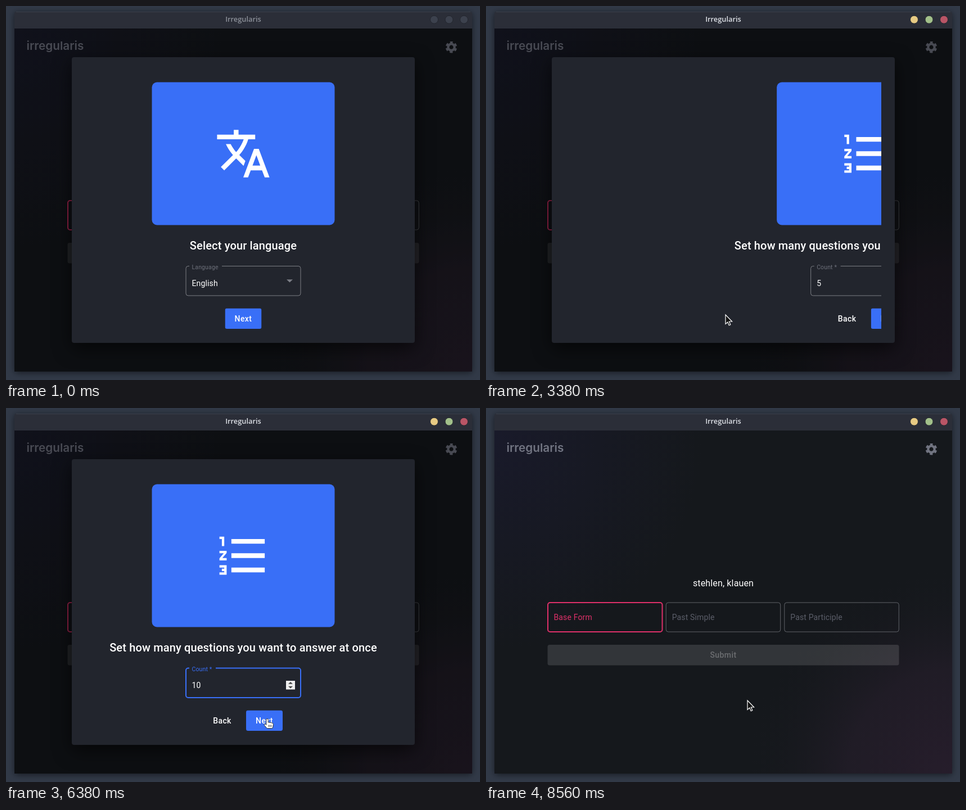
Recreate the animation shown at these times as an HTML page. Size 843 by 665 pixels, loop 9.2 s.

```html
<!DOCTYPE html>
<html lang="en">
<head>
<meta charset="utf-8">
<title>Irregularis</title>
<style>
  html, body { margin: 0; width: 100%; height: 100%; overflow: hidden; background: #313946; }
  svg { display: block; }
  text { font: 14px Roboto, sans-serif; letter-spacing: .14px; fill: #fff; }
  .mid { text-anchor: middle; }
  .bold { font-weight: 500; letter-spacing: .4px; }
  .head { font-size: 20px; font-weight: 500; letter-spacing: .15px; }
  .label { font-size: 10.5px; fill: #6d707a; }
  .outline { fill: none; stroke: #7c7e84; stroke-width: 1; }
  .hover .outline { stroke: #96989d; stroke-width: 1.8; }
  .focus .outline { stroke: #396ff7; stroke-width: 2; }
  .focus .label { fill: #396ff7; }
  .dot { fill: #3c414d; stroke: #23262e; }
  #title { font: 600 12.8px "Open Sans", sans-serif; letter-spacing: 0; fill: #8c9099; }
  .active #title { fill: #dde0e6; }
  .active .dot { fill: var(--c); }
</style>
</head>
<body>
<svg id="stage" width="843" height="665" viewBox="0 0 843 665"></svg>
<script>
const LOOP = 9200, BLUE = '#396ff7', SHIFT = 562;
const OPEN = 1250, CHOOSE = 1810, NEXT1 = 3097, NEXT2 = 6560, FINISH = 8130;
const stage = document.getElementById('stage');

const icons = {
  translate: 'M12.87 15.07l-2.54-2.51.03-.03c1.74-1.94 2.98-4.17 3.71-6.53H17V4h-7V2H8v2H1v1.99h11.17C11.5 7.92 10.44 9.75 9 11.35 8.07 10.32 7.3 9.19 6.69 8h-2c.73 1.63 1.73 3.17 2.98 4.56l-5.09 5.02L4 19l5-5 3.11 3.11.76-2.04zM18.5 10h-2L12 22h2l1.12-3h4.75L21 22h2l-4.5-12zm-2.62 7l1.62-4.33L19.12 17h-3.24z',
  list: 'M2 17h2v.5H3v1h1v.5H2v1h3v-4H2v1zm1-9h1V4H2v1h1v3zm-1 3h1.8L2 13.1v.9h3v-1H3.2L5 10.9V10H2v1zm5-6v2h14V5H7zm0 14h14v-2H7v2zm0-6h14v-2H7v2z',
  done: 'M22 5.18 10.59 16.6l-4.24-4.24 1.41-1.41 2.83 2.83 10-10L22 5.18zm-2.21 5.04c.13.57.21 1.17.21 1.78 0 4.42-3.58 8-8 8s-8-3.58-8-8 3.58-8 8-8c1.58 0 3.04.46 4.28 1.25l1.44-1.44C16.1 2.67 14.13 2 12 2 6.48 2 2 6.48 2 12s4.48 10 10 10 10-4.48 10-10c0-1.19-.22-2.33-.6-3.39l-1.61 1.61z'
};

const text = (x, y, s, cls = '', extra = '') => `<text x="${x}" y="${y}" class="${cls}" ${extra}>${s}</text>`;

const ripple = (time, x, y) => `<circle class="ripple" data-time="${time}" cx="${x}" cy="${y}" fill="#fff"/>`;

const button = (x, y, w, label, time) =>
  `<svg x="${x}" y="${y}" width="${w}" height="36.5"><rect width="${w}" height="36.5" rx="3.5" fill="${BLUE}"/>
   ${ripple(time, 38, 16)}${text(w / 2, 23, label, 'mid bold')}</svg>`;

const card = (icon, title) =>
  `<rect x="259.5" y="135.5" width="325" height="254" rx="9" fill="${BLUE}"/>
   <path d="${icons[icon]}" transform="translate(371.2 211.7) scale(4.235)" fill="#fff"/>
   ${text(422, 432.7, title, 'mid head')}`;

// Outlined box whose top edge is open from x=326 to the end of the label.
const field = (id, label, notch) =>
  `<g id="${id}"><path class="outline" d="M${notch} 462.5H520a4 4 0 0 1 4 4V511a4 4 0 0 1-4 4H324a4 4 0 0 1-4-4V466.5a4 4 0 0 1 4-4H326"/>
   ${text(330.5, 468.3, label, 'label')}${text(330.5, 497.7, '', 'value')}</g>`;

const answer = (x, label, color, border, width) =>
  `<rect x="${x}" y="346" width="203.5" height="52" rx="4" fill="none" stroke="${border}" stroke-width="${width}"/>
   ${text(x + 10.5, 377.3, label, '', `style="fill:${color}"`)}`;

const languages = ['English', 'Slovak', 'Spanish', 'Hungarian', 'German'];
const ROW = 41.7;
const menuRow = (name, i) =>
  `<svg x="314" y="${293 + i * ROW}" width="212" height="${ROW}">
   <rect width="212" height="${ROW}" fill="${['#42454f', , , , '#303237'][i] || 'none'}"/>
   ${i == 4 ? ripple(CHOOSE - 30, 114, 20) : ''}
   ${text(16.5, 25.2, name, '', i ? '' : `style="fill:${BLUE}"`)}</svg>`;

const dots = ['#e7ca83', '#a2c08a', '#b95566'];

stage.innerHTML = `
<defs>
  <radialGradient id="cool" gradientUnits="userSpaceOnUse" cx="15" cy="60" r="370">
    <stop stop-color="#191a2a"/><stop offset="1" stop-color="#15181c"/></radialGradient>
  <radialGradient id="warm" gradientUnits="userSpaceOnUse" cx="829" cy="650" r="370">
    <stop stop-color="#261d2b"/><stop offset=".5" stop-color="#201c26"/><stop offset="1" stop-color="#15181c" stop-opacity="0"/></radialGradient>
  <clipPath id="view"><rect x="141" y="91" width="${SHIFT}" height="508"/></clipPath>
</defs>
<rect width="843" height="665" fill="#323a48"/>
<rect x="15" y="10" width="814" height="640" rx="4" fill="#2b2e38" style="filter:drop-shadow(0 2px 6px #0008)"/>
<path d="M18 10.5H826" stroke="#3b404b"/>
<g id="bar">${text(422, 28.2, 'Irregularis', 'mid', 'id="title"')}
  ${dots.map((c, i) => `<circle class="dot" style="--c:${c}" cx="${761.5 + 26.5 * i}" cy="24.2" r="7"/>`).join('')}</g>
<rect x="15" y="40" width="814" height="610" fill="url(#cool)"/>
<rect x="15" y="40" width="814" height="610" fill="url(#warm)"/>
${text(36.5, 78, 'irregularis', '', 'style="font:600 20.7px Inter,sans-serif;letter-spacing:0;fill:#717481"')}
<g transform="translate(792 73.2)" fill="none" stroke="#717481">
  <circle r="5.7" stroke-width="4.2"/>
  <circle r="8.6" stroke-width="3.4" stroke-dasharray="5 4.006" stroke-dashoffset="2.5" transform="rotate(-90)"/>
</g>
${text(422, 316.8, 'stehlen, klauen', 'mid', 'style="font-size:16px"')}
${answer(320.2, 'Past Simple', '#5b5e69', '#606369', 1)}
${answer(530.8, 'Past Participle', '#5b5e69', '#606369', 1)}
${answer(110, 'Base Form', '#de3069', '#de3069', 2)}
<rect x="109.5" y="421" width="625" height="36.5" rx="3.5" fill="#fff" fill-opacity=".125"/>
${text(422, 444.2, 'Submit', 'mid bold', 'style="fill:#6c6e71"')}
<g id="dialog">
  <rect x="15" y="40" width="814" height="610" fill="#000" fill-opacity=".36"/>
  <rect x="117" y="91" width="610" height="508" rx="4" fill="#22252d" style="filter:drop-shadow(0 10px 16px #0009)"/>
  <g clip-path="url(#view)">
    <g class="slide">${card('translate', 'Select your language')}${field('lang', 'Language', 384)}
      <path d="M499 486.3h11l-5.5 5.3z" fill="#7c7e86"/>
      ${button(389.5, 537.5, 65, 'Next', NEXT1 - 80)}</g>
    <g class="slide">${card('list', 'Set how many questions you want to answer at once')}${field('count', 'Count *', 373)}
      <g id="spinner"><rect x="498" y="485" width="16" height="15.5" fill="#efefef"/>
        <path d="M502 490.8h8l-4-3.8zM502 494.8h8l-4 3.8z" fill="#444"/></g>
      ${text(384.5, 560.5, 'Back', 'mid bold')}${button(427, 537.5, 65, 'Next', NEXT2 - 20)}</g>
    <g class="slide">${card('done', 'Everything set')}
      ${text(422, 473.5, 'These settings can be change at any time through the app settings.', 'mid')}
      ${text(381.5, 522.3, 'Back', 'mid bold')}${button(424, 499.3, 71, 'Finish', FINISH)}</g>
  </g>
  <g id="menu"><rect x="314" y="293" width="212" height="208.5" rx="4" fill="#292b31" style="filter:drop-shadow(0 4px 5px #0007)"/>
    ${languages.map(menuRow).join('')}</g>
</g>
<g id="cursor">
  <path id="arrow" d="M0 0V16.5L3.8 13 6.2 18.8 8.8 17.7 6.4 12H11.6Z" fill="#111" stroke="#fff" stroke-width="1.2"/>
  <g id="hand" stroke="#222" stroke-width=".9">
    <path d="M-.2 10.5V1.2a1.7 1.7 0 0 1 3.4 0V6q4.5 0 8 1.4 1.4.6 1.2 2.2l-.8 5q-.3 2-2 2H3Q1.5 17 .5 15.8L-3.4 11.2q-.9-1.2 0-2 1-.8 2 .1z" fill="#fff"/>
    <path d="M4 10.5v3.5M6.4 10.5v3.5M8.8 10.5v3.5" fill="none"/></g>
</g>`;

const $ = s => stage.querySelector(s);
const slides = [...stage.querySelectorAll('.slide')];
const ripples = [...stage.querySelectorAll('.ripple')];

const progress = (t, start, length) => Math.min(1, Math.max(0, (t - start) / length));
const between = (t, a, b) => t >= a && t < b;
const show = (sel, on) => $(sel).style.display = on ? '' : 'none';

const bezier = (x1, y1, x2, y2) => x => {
  const at = (u, a, b) => 3 * (1 - u) ** 2 * u * a + 3 * (1 - u) * u * u * b + u ** 3;
  let lo = 0, hi = 1;
  for (let i = 0; i < 24; i++) {
    const u = (lo + hi) / 2;
    at(u, x1, x2) < x ? lo = u : hi = u;
  }
  return at(hi, y1, y2);
};
const standard = bezier(.4, 0, .2, 1), decelerate = bezier(0, 0, .2, 1), sharp = bezier(.4, 0, .6, 1);
const smooth = p => p * p * (3 - 2 * p);

// time, x, y of the pointer's hot spot
const path = [
  [380, 384, 33], [630, 384, 33], [1180, 428, 480], [2480, 428, 480], [2860, 426, 549],
  [3820, 426, 549], [4250, 487, 510], [4430, 487, 510], [4750, 505, 489], [5930, 505, 489],
  [6380, 463, 553], [7570, 463, 553], [7810, 465, 520]
];
const handTimes = [[1130, 2660], [2770, 3230], [6280, 7440], [7690, 8300]];

function moveCursor(t) {
  let i = path.findLastIndex(k => k[0] <= t);
  show('#cursor', i >= 0);
  if (i < 0) return;
  const a = path[i], b = path[i + 1] || a;
  const p = a == b ? 0 : smooth(progress(t, a[0], b[0] - a[0]));
  const [x, y] = [1, 2].map(n => a[n] + (b[n] - a[n]) * p);
  $('#cursor').setAttribute('transform', `translate(${x} ${y})`);
  const hand = handTimes.some(([from, to]) => between(t, from, to));
  show('#hand', hand);
  show('#arrow', !hand);
}

function moveMenu(t) {
  const closing = t >= CHOOSE;
  const fade = closing ? 1 - standard(progress(t, CHOOSE + 20, 240)) : standard(progress(t, OPEN, 280));
  const grow = closing ? 1 - standard(progress(t, CHOOSE + 100, 160)) : standard(progress(t, OPEN, 187));
  const s = .75 + .25 * grow;
  show('#menu', fade > 0);
  $('#menu').setAttribute('opacity', fade);
  $('#menu').setAttribute('transform', `translate(420 397) scale(${s} ${s * s}) translate(-420 -397)`);
}

function draw(t) {
  $('#bar').setAttribute('class', t >= OPEN ? 'active' : '');

  const leave = [NEXT1, NEXT2, Infinity];
  slides.forEach((slide, i) => {
    const enter = i ? 1 - decelerate(progress(t, leave[i - 1] + 195, 394)) : 0;
    const exit = sharp(progress(t, leave[i], 195));
    slide.setAttribute('transform', `translate(${SHIFT * (enter + exit)})`);
  });

  $('#lang').setAttribute('class', t >= OPEN ? 'focus' : t >= 1150 ? 'hover' : '');
  $('#lang .value').textContent = t < CHOOSE ? 'English' : 'German';
  $('#count').setAttribute('class', t >= 4880 ? 'focus' : t >= 4190 ? 'hover' : '');
  const clicks = Math.floor((t - 4880) / 250) + 1;
  $('#count .value').textContent = 5 + Math.min(5, Math.max(0, clicks));
  show('#spinner', t >= 4600);

  for (const r of ripples) {
    const p = progress(t, +r.dataset.time, 450);
    r.setAttribute('r', 60 * decelerate(p));
    r.setAttribute('opacity', .25 * (1 - p));
  }

  moveMenu(t);
  const gone = standard(progress(t, FINISH + 50, 370));
  $('#dialog').setAttribute('opacity', 1 - gone);
  moveCursor(t);
}

function tick() {
  draw(performance.now() % LOOP);
  requestAnimationFrame(tick);
}
tick();
</script>
</body>
</html>
```
